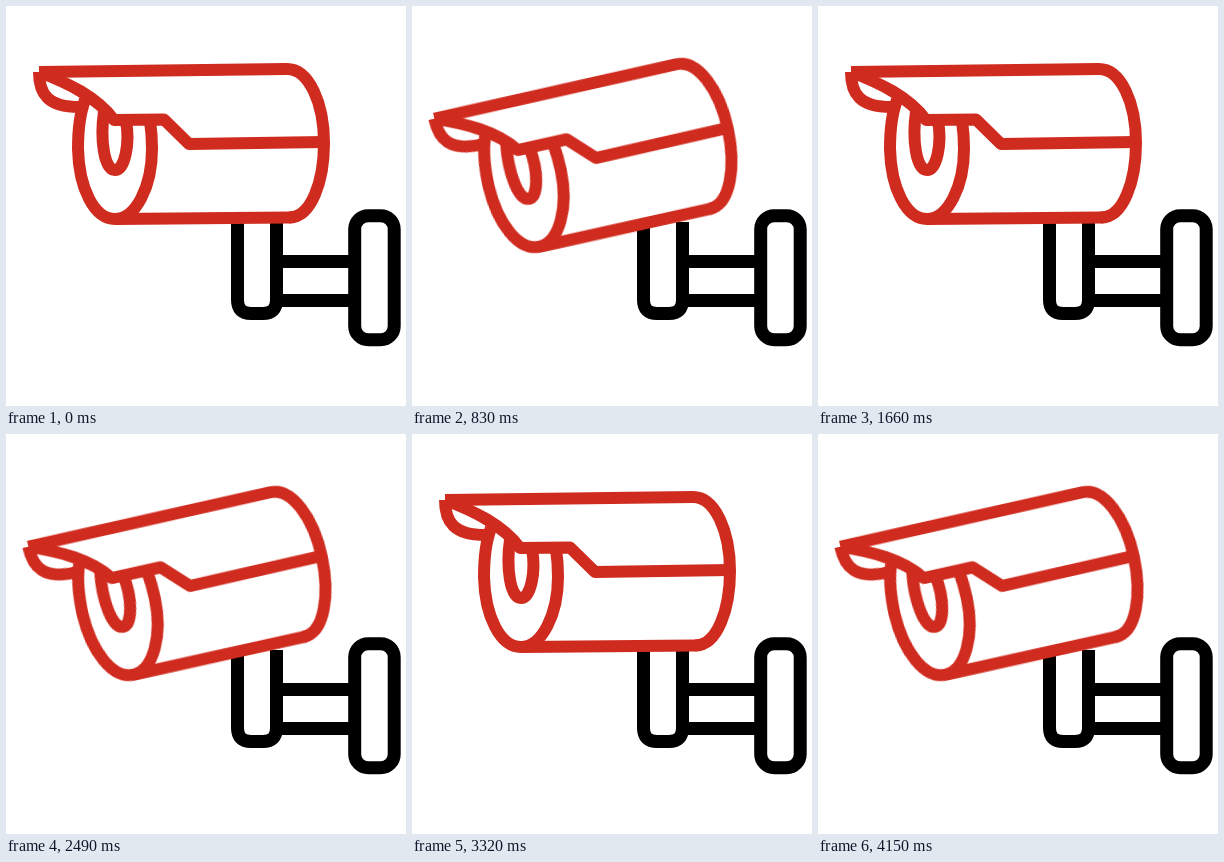
Animation of 400 by 400 pixels, one loop 4.98 s. Source, as an HTML page without scripts:

```html
<!DOCTYPE html>
<html lang="en">
<head>
<meta charset="utf-8">
<title>Security camera</title>
<style>
  html, body { margin: 0; width: 100%; height: 100%; overflow: hidden; background: #fff; }
  svg { display: block; width: 100vw; height: 100vh; fill: none; }
  .mount { stroke: #000; stroke-width: 13; }
  .camera {
    stroke: #d02b1f;
    stroke-width: 12;
    stroke-linejoin: round;
    transform-origin: 250px 140px;
    animation: tilt 1660ms step-end infinite;
  }
  @keyframes tilt {
    0% { transform: rotate(0deg); }
    50% { transform: rotate(-12deg); }
  }
</style>
</head>
<body>
<svg viewBox="0 0 400 400">
  <g class="mount">
    <path d="M231.5 216V294Q231.5 307.5 245 307.5H257Q270.5 307.5 270.5 294V216"/>
    <path d="M271 255.5H348M271 294.5H348"/>
    <rect x="348.7" y="209.7" width="39.5" height="124" rx="13.5"/>
  </g>
  <g class="camera">
    <!-- shell -->
    <path d="M33 66L281 63C303 63 318 97 318 137C318 176 305 211 284 211.4L109 213"/>
    <path d="M283 211.4L289 211"/>
    <!-- visor and side seam -->
    <path d="M33 66C33 88 42 101 73 101"/>
    <path d="M33 66C62 77 91 91 108 114L158 113.500L183 138L318 136"/>
    <!-- front rim -->
    <path d="M79 94C74 107 72 124 72 143C73 182 88 213 109 213C130 213 146 180 146 143Q146 128 144 115"/>
    <!-- lens -->
    <path d="M98 106C94 133 98 164 109 164C119 164 124 137 120 115"/>
  </g>
</svg>
</body>
</html>
```
